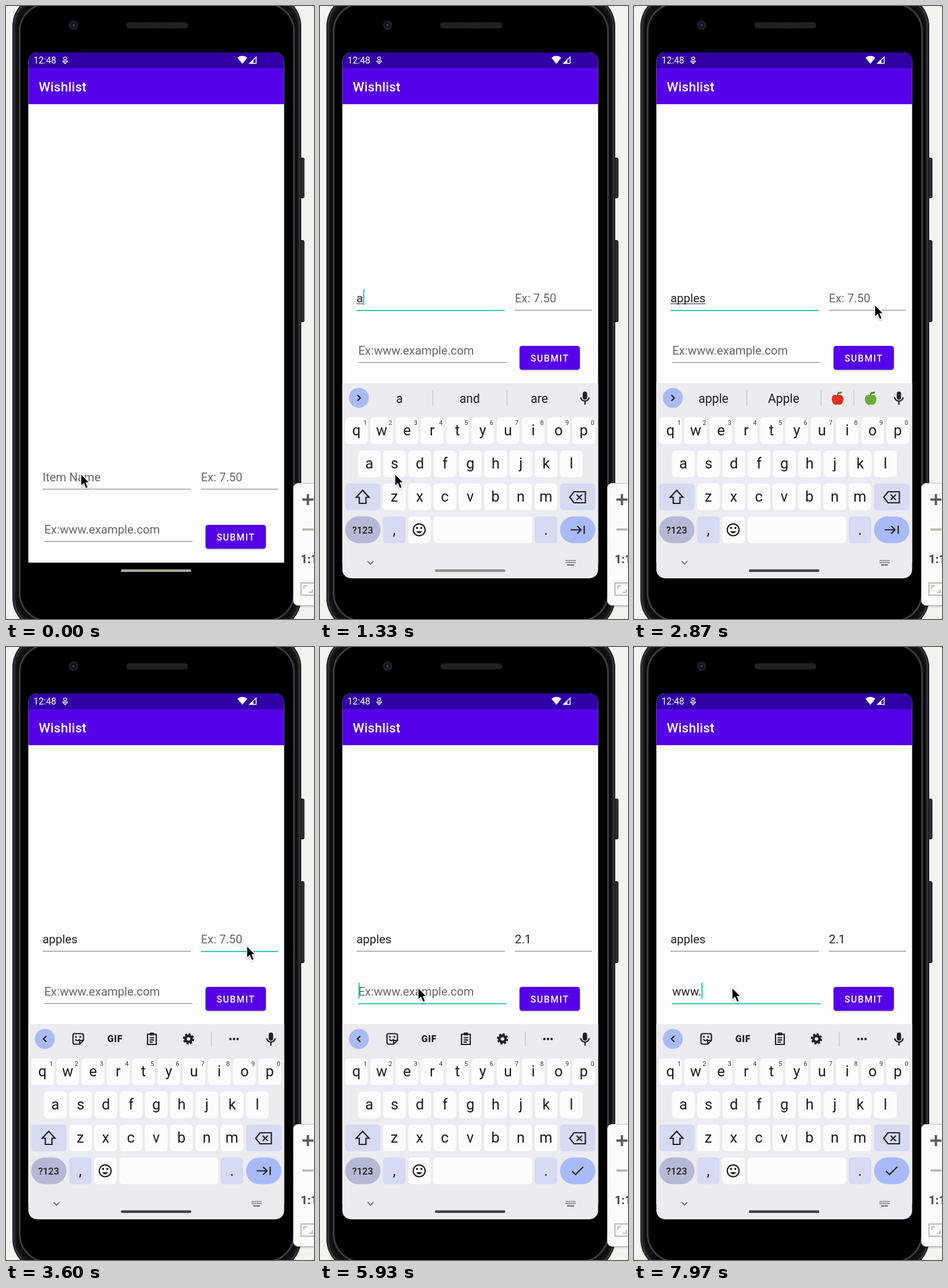
An HTML page that plays this animation: 531 px wide and 1055 px high, repeating every 8000 ms.

```html
<!DOCTYPE html>
<html lang="en">
<head>
<meta charset="utf-8">
<title>Wishlist</title>
<style>
  html, body { margin: 0; width: 100%; height: 100%; overflow: hidden; background: #f3f3f0; }
  svg { display: block; width: 531px; height: 1055px; font-family: Roboto, sans-serif; }
  .field { font-size: 20.4px; }
  .key { font-size: 25.5px; text-anchor: middle; fill: #1b1c20; }
  .sup { font-size: 11px; text-anchor: middle; fill: #33343a; }
  .word { font-size: 21.2px; text-anchor: middle; fill: #1f2024; }
  .ink { fill: none; stroke: #1f2024; stroke-width: 2.2; }
  .rule { stroke: #c3c3c8; stroke-width: 1.2; }

  #mouse { animation: mouse 8s linear infinite; }
  #keyboard { animation: slide 8s infinite; }
  #handle { animation: tint 8s linear infinite; }

  @keyframes mouse {
    0%, 25.6% { transform: translate(129px, 805px); animation-timing-function: ease-in; }
    28.375% { transform: translate(306px, 727px); animation-timing-function: ease-out; }
    33.5%, 63.5% { transform: translate(415px, 514px); animation-timing-function: ease-in-out; }
    70.5%, 100% { transform: translate(169px, 586px); }
  }
  @keyframes slide {
    0%, 4.125% { transform: translateY(336px); animation-timing-function: cubic-bezier(.333, .667, .667, 1); }
    7.875%, 100% { transform: none; }
  }
  @keyframes tint {
    0%, 4.125% { fill: #a6a69c; }
    6.6%, 11% { fill: #e6e6ea; }
    16.6% { fill: #909091; }
    21%, 100% { fill: #43444a; }
  }
</style>
</head>
<body>
<svg viewBox="0 0 531 1055">
  <defs>
    <clipPath id="screen"><rect x="38.5" y="80" width="441" height="905" rx="15"/></clipPath>
    <filter id="soft" x="-20%" y="-20%" width="140%" height="150%">
      <feDropShadow dx="0" dy="1.2" stdDeviation="1.4" flood-opacity=".3"/>
    </filter>
    <pattern id="mesh" width="4" height="4" patternUnits="userSpaceOnUse">
      <rect width="4" height="4" fill="#191919"/><path d="M0 4 4 0" stroke="#3a3a3a"/>
    </pattern>
    <g id="apple">
      <path d="M0-5C-4-8-10-6-10 1-10 7-6 11-3 11-1.5 11-1 10 0 10S1.5 11 3 11C6 11 10 7 10 1 10-6 4-8 0-5Z"/>
      <path d="M0-5Q0-8 2-11" fill="none" stroke="#6b4326" stroke-width="1.8"/>
    </g>
  </defs>

  <!-- phone body -->
  <g fill="#2a2c2e" stroke="#111" stroke-width="1">
    <rect x="505" y="261.500" width="9" height="69" rx="2"/>
    <rect x="505" y="403.500" width="9" height="140" rx="2"/>
  </g>
  <rect x="11" y="-20" width="498" height="1094" rx="55" fill="#151617"/>
  <rect x="14" y="-17" width="492" height="1088" rx="52" fill="none" stroke="#333638" stroke-width="3"/>
  <rect x="18" y="-11" width="484" height="1076" rx="51" fill="#0d0e0f"/>
  <rect x="23.500" y="-4" width="473" height="1062" rx="48" fill="#000" stroke="#3a3d40" stroke-width="3"/>
  <circle cx="116.500" cy="33" r="8" fill="#202127"/>
  <circle cx="116.500" cy="33" r="5" fill="#11111f"/>
  <circle cx="116.500" cy="33" r="2.200" fill="#34346a"/>
  <rect x="207.500" y="28" width="106.500" height="10.500" rx="5" fill="url(#mesh)"/>

  <g clip-path="url(#screen)">
    <rect x="38" y="80" width="442" height="878" fill="#fdfdfc"/>
    <rect x="38" y="80" width="442" height="27" fill="#3000a6"/>
    <rect x="38" y="107" width="442" height="62" fill="#5500e8"/>
    <g fill="#fff">
      <text x="47.500" y="98.700" font-size="15.7">12:48</text>
      <text x="56.500" y="146.500" font-size="22.500" font-weight="500" letter-spacing=".25">Wishlist</text>
      <path d="M399 89Q407.500 82.500 416 89L407.500 99.500Z"/>
      <path d="M432 86V99.500H418Z"/>
      <path d="M430.500 89.500V98H426.500V93.500Z" fill="#3000a6"/>
      <path d="M102 99.500 97.800 95.300 99 94 102 96.500 105 94 106.200 95.300ZM102 93.500 99 90.500A2.200 2.200 0 0 1 102 88 2.200 2.200 0 0 1 105 90.500Z" fill="none" stroke="#fff" stroke-width="1.2"/>
    </g>

    <g id="form">
      <g filter="url(#soft)"><rect x="344" y="893" width="104" height="41" rx="4.500" fill="#5500e8"/></g>
      <text x="363" y="919.700" font-size="15.700" font-weight="500" letter-spacing="1.6" fill="#fff">SUBMIT</text>
      <path id="compose" stroke="#222"/>
      <path id="caret" stroke="#2acbbd" stroke-width="2.2"/>
    </g>

    <g id="keyboard">
      <rect x="38" y="649" width="442" height="337" fill="#ecebf0"/>
      <circle cx="67" cy="674.500" r="17.200" fill="#a9baf8"/>
      <path id="chevron" class="ink"/>
      <g id="tools">
        <path class="ink" d="M118 665.500H130.500Q133.500 665.500 133.500 668.500V677L127 683.500H118.500Q115.500 683.500 115.500 680.500V668.500Q115.500 665.500 118 665.500ZM133 677H129Q127 677 127 679V683M119.500 675Q123 680 127 675"/>
        <path d="M119 669.500h3v3h-3zM126.500 669.500h3v3h-3z" fill="#1f2024"/>
        <text x="188" y="680.300" font-size="16" font-weight="900" letter-spacing=".6" text-anchor="middle" fill="#1f2024">GIF</text>
        <path class="ink" d="M244 666.500H259V684H244ZM247.500 672.500H255.500M247.500 676.300H255.500M247.500 680H253"/>
        <rect x="247.500" y="663.500" width="8" height="5" rx="1.500" fill="#1f2024"/>
        <circle class="ink" cx="314.700" cy="674.500" r="5.300" style="stroke-width:4.5"/>
        <circle class="ink" cx="314.700" cy="674.500" r="8.200" stroke-dasharray="3.7 2.74" style="stroke-width:3"/>
        <path class="rule" d="M354 662V688"/>
        <path d="M385 672.700h3.700v3.700h-3.700zM391.200 672.700h3.700v3.700h-3.700zM397.400 672.700h3.700v3.700h-3.700z" fill="#1f2024"/>
      </g>
      <g id="hints">
        <path class="rule" d="M194.500 661V688M322.500 661V688"/>
        <text id="word1" class="word" x="137" y="683"></text>
        <text id="word2" class="word" x="258" y="683"></text>
        <text id="word3" class="word" x="378" y="683"></text>
        <g id="fruit">
          <path class="rule" d="M379 661V688"/>
          <use href="#apple" x="351" y="675.500" fill="#e0301e"/>
          <use href="#apple" x="408" y="675.500" fill="#69b032"/>
          <path d="M352 667Q353 663 359 664 357 669 352 667ZM409 667Q410 663 416 664 414 669 409 667Z" fill="#3f8a2a"/>
        </g>
      </g>
      <rect x="453" y="663.500" width="7.500" height="14" rx="3.750" fill="#1f2024"/>
      <path class="ink" d="M449.500 673.500A7.300 7.300 0 0 0 464 673.500M456.800 681V686"/>

      <g id="keys"></g>
      <path class="ink" d="M73.500 833.500 62.500 845.500H67.700V856H79.300V845.500H84.500Z"/>
      <path class="ink" d="M438 836H457.500V855H438L430.500 845.500ZM442.500 841 451.500 850M451.500 841 442.500 850"/>
      <circle class="ink" cx="171" cy="901.500" r="10.200"/>
      <path d="M165.500 904Q171 911 176.500 904Z" fill="#1f2024"/>
      <circle cx="167.300" cy="898.300" r="1.700"/><circle cx="174.700" cy="898.300" r="1.700"/>
      <path id="action" class="ink"/>
      <path d="M82 955.500 87 960.700 92 955.500" fill="none" stroke="#66676c" stroke-width="1.7"/>
      <path d="M423.500 954.500H440.500M423.500 958H440.500" stroke="#66676c" stroke-width="2" stroke-dasharray="2 1"/>
      <path d="M426 962H438" stroke="#66676c" stroke-width="2"/>
    </g>
    <rect id="handle" x="198" y="969.500" width="121.500" height="4.500" rx="2.200"/>
  </g>

  <!-- zoom panel -->
  <rect x="495.500" y="821.500" width="50" height="210" rx="8" fill="#fbfbfa" stroke="#c6c6c4" filter="url(#soft)"/>
  <path d="M511 849.500H530M520.500 840V859" stroke="#5b5b5b" stroke-width="4"/>
  <path d="M511 901H530" stroke="#bdbdb4" stroke-width="4"/>
  <text x="508" y="959" font-size="20" font-weight="900" fill="#555">1:1</text>
  <rect x="508.500" y="993" width="30" height="21" fill="none" stroke="#bdbdb4" stroke-width="2.2"/>
  <path d="M513.500 1003V998H519M528 1004V1009H522" fill="none" stroke="#bdbdb4" stroke-width="2"/>

  <g id="mouse">
    <path d="M0 0V21.500L5 17 8.500 25.500 12.600 23.800 9.200 15.600H15.500Z" fill="#000" stroke="#fff" stroke-width="1.5" filter="url(#soft)"/>
  </g>
</svg>
<script>
const LOOP = 8000, LIFT = -308;
const $ = id => document.getElementById(id);

function add(parent, tag, attrs, text = '') {
  const el = document.createElementNS('http://www.w3.org/2000/svg', tag);
  for (const name in attrs) el.setAttribute(name, attrs[name]);
  el.textContent = text;
  parent.append(el);
  return el;
}

// Keys
const PITCH = 43.55, LIGHT = '#fcfcfc', BLUE = '#d6daf3';
function key(x, y, w, fill, rx = 6) {
  add($('keys'), 'rect', { x, y, width: w, height: 46, rx, fill });
}
[['qwertyuiop', 43.3, 708], ['asdfghjkl', 65.5, 765], ['zxcvbnm', 108.7, 821.7]].forEach(([row, left, y], r) => {
  [...row].forEach((letter, i) => {
    const x = left + i * PITCH;
    key(x, y, 39, LIGHT);
    add($('keys'), 'text', { class: 'key', x: x + 19.5, y: y + 31 }, letter);
    if (r === 0) add($('keys'), 'text', { class: 'sup', x: x + 34.5, y: y + 13 }, (i + 1) % 10);
  });
});
key(43.3, 821.7, 61, BLUE);
key(413.8, 821.7, 61, BLUE);
key(43.3, 878.5, 61, '#b5b9d5', 23);
key(108.7, 878.5, 39, BLUE);
key(152, 878.5, 39, LIGHT);
key(195.5, 878.5, 170.5, LIGHT);
key(370, 878.5, 39, BLUE);
key(413.8, 878.5, 61, '#a9baf8', 23);
add($('keys'), 'text', { class: 'key', x: 73.5, y: 908, style: 'font-size:16.5px;font-weight:500' }, '?123');
add($('keys'), 'text', { class: 'key', x: 128, y: 910 }, ',');
add($('keys'), 'text', { class: 'key', x: 389.5, y: 910 }, '.');

// Form fields: focus time and the times of each typed character
const fields = [
  { x: 63, y: 818, w: 255.5, hint: 'Item Name', focus: 260, text: 'apples', times: [1250, 1460, 1610, 1800, 1980, 2190] },
  { x: 336, y: 818, w: 133, hint: 'Ex: 7.50', focus: 3080, text: '2.1', times: [4250, 4560, 4840] },
  { x: 66, y: 908, w: 255.5, hint: 'Ex:www.example.com', focus: 5760, text: 'www.', times: [7020, 7220, 7410, 7780] }
];
for (const f of fields) {
  f.label = add($('form'), 'text', { class: 'field', x: f.x, y: f.y });
  f.line = add($('form'), 'path', {});
}
$('form').append($('compose'), $('caret'));

const suggestions = ['', 'a and are', 'app apply ap', 'app apple apps', 'apple apply apples', 'apple Apple', 'apple Apple'];
const show = (id, on) => $(id).setAttribute('visibility', on ? 'inherit' : 'hidden');
const path = (id, d) => $(id).setAttribute('d', d);

function render(t) {
  const active = fields.findLast(f => t >= f.focus);
  $('form').setAttribute('transform', `translate(0 ${t >= 330 ? LIFT : 0})`);

  for (const f of fields) {
    const value = f.text.slice(0, f.times.filter(at => t >= at).length);
    const on = f === active;
    f.count = value.length;
    f.label.textContent = value || f.hint;
    f.label.setAttribute('fill', value ? '#222' : '#666664');
    f.line.setAttribute('d', `M${f.x} ${f.y + (on ? 14 : 13.5)}h${f.w}`);
    f.line.setAttribute('stroke', on ? '#2acbbd' : '#777772');
    f.line.setAttribute('stroke-width', on ? 2.2 : 1.15);
  }

  let caret = '', underline = '';
  if (active) {
    const width = active.count ? active.label.getComputedTextLength() : 0;
    const since = t - Math.max(active.focus, ...active.times.filter(at => t >= at));
    if (since % 1000 < 500) caret = `M${active.x + width + 1.2} ${active.y - 22.5}v27.5`;
    if (active === fields[0] && width) underline = `M${active.x} ${active.y + 2.5}h${width}`;
  }
  path('caret', caret);
  path('compose', underline);

  const typed = active === fields[0] ? active.count : 0;
  const words = suggestions[typed].split(' ');
  for (let i = 0; i < 3; i++) $('word' + (i + 1)).textContent = words[i] || '';
  show('tools', !typed);
  show('hints', typed);
  show('fruit', typed >= 5);
  path('chevron', typed ? 'M64.5 669.5 69.5 674.5 64.5 679.5' : 'M69.5 669.5 64.5 674.5 69.5 679.5');
  path('action', active === fields[2]
    ? 'M434.5 902 440.5 908 454 894.5'
    : 'M432 901.5H450M443.5 895 450 901.5 443.5 908M455.5 894.5V908.5');
}

const start = performance.now();
function tick() {
  render((performance.now() - start) % LOOP);
  requestAnimationFrame(tick);
}
tick();
</script>
</body>
</html>
```
